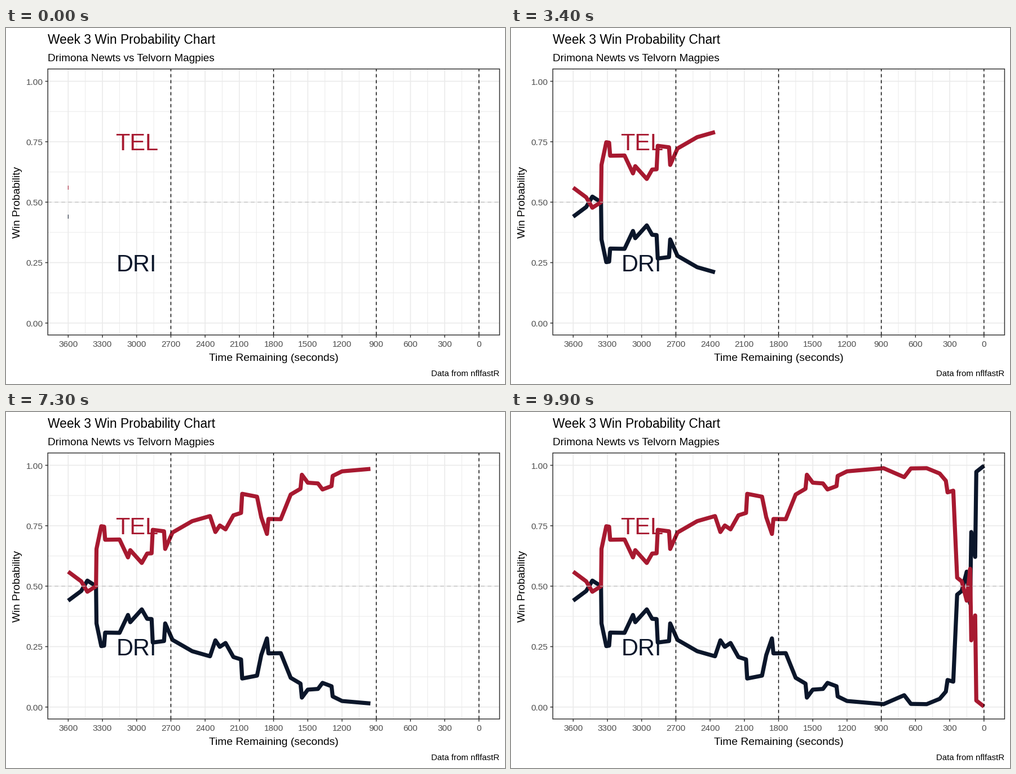
A matplotlib script that plays this animation: 885x632 px, repeating every 10 s.

```python
import numpy as np
import matplotlib.pyplot as plt
from matplotlib.animation import FuncAnimation
from matplotlib.patches import Rectangle

W, H, DPI = 885, 632, 100
FRAMES, INTERVAL = 100, 100
GAME = 3600
PX = 72 / DPI  # points per pixel

RED, NAVY = "#A71930", "#0B162A"
GRID, DARK, LABEL = "#EBEBEB", "#333333", "#4D4D4D"
LEFT, RIGHT, TOP, BOTTOM = 74.2, 875.4, 72.7, 545

# turning points: (seconds remaining, win probability of the red team)
plays = np.array([
    (3600, .560), (3486, .520), (3432, .477), (3356, .500), (3352, .654),
    (3310, .748), (3285, .746), (3276, .692), (3150, .693), (3076, .619),
    (3056, .649), (2955, .596), (2908, .635), (2869, .636), (2859, .733),
    (2760, .727), (2750, .654), (2686, .722), (2513, .769), (2357, .790),
    (2310, .724), (2271, .751), (2221, .735), (2152, .793), (2085, .803),
    (2075, .882), (1945, .870), (1908, .785), (1858, .716), (1845, .778),
    (1737, .777), (1650, .879), (1564, .903), (1552, .961), (1500, .928),
    (1411, .925), (1371, .900), (1292, .914), (1282, .956), (1200, .975),
    (880, .988), (699, .951), (640, .987), (502, .988), (388, .966),
    (334, .936), (319, .888), (269, .895), (235, .535), (195, .520),
    (151, .440), (121, .572), (111, .276), (77, .379), (67, .027),
    (0, .002),
])
# each play lands on its nearest animation step
steps = np.rint((FRAMES - 1) * (1 - plays[:, 0] / GAME)).astype(int)


def px(sec):
    return 838.8 - sec * 728.5 / GAME


def py(prob):
    return 523.8 - prob * 429.2


plt.rcParams.update({"font.family": "Liberation Sans", "path.snap": False})
fig = plt.figure(figsize=(W / DPI, H / DPI), dpi=DPI, facecolor="white")
ax = fig.add_axes([0, 0, 1, 1])
ax.set(xlim=(0, W), ylim=(H, 0))
ax.axis("off")


def line(xs, ys, width, color, z, **kw):
    return ax.plot(xs, ys, lw=width * PX, color=color, zorder=z,
                   solid_capstyle="butt", solid_joinstyle="round", **kw)[0]


def vert(sec, *args, **kw):
    line([px(sec)] * 2, [BOTTOM, TOP], *args, **kw)


def horiz(prob, *args, **kw):
    line([LEFT, RIGHT], [py(prob)] * 2, *args, **kw)


def text(x, y, s, size, color="black", ha="left", **kw):
    ax.text(x, y, s, fontsize=size * PX, color=color, ha=ha,
            va="baseline", zorder=8, **kw)


# panel grid and ticks
for sec in range(150, GAME, 300):
    vert(sec, 1, GRID, 1)
for prob in np.arange(.125, 1, .25):
    horiz(prob, 1, GRID, 1)
for sec in range(0, GAME + 1, 300):
    x = px(sec)
    vert(sec, 1.7, GRID, 2)
    line([x, x], [BOTTOM, BOTTOM + 4.6], 1.5, DARK, 7)
    text(x, 566, str(sec), 15.4, LABEL, "center")
for prob in np.arange(0, 1.1, .25):
    y = py(prob)
    horiz(prob, 1.7, GRID, 2)
    line([LEFT - 4.6, LEFT], [y, y], 1.5, DARK, 7)
    text(65.5, y + 6, f"{prob:.2f}", 15.4, LABEL, "right")

# reference lines and frame
horiz(.5, 1.2, "#BEBEBE", 5, dashes=(5.5, 4.5))
for sec in range(0, 2701, 900):
    vert(sec, 1.4, "black", 6, dashes=(4, 3.6))
ax.add_patch(Rectangle((LEFT, TOP), RIGHT - LEFT, BOTTOM - TOP, fill=False,
                       ec=DARK, lw=1.5 * PX, zorder=7))

# labels
text(74, 28, "Week 3 Win Probability Chart", 22.7)
text(74, 59, "Drimona Newts vs Telvorn Magpies", 19.06)
text(474.5, 591, "Time Remaining (seconds)", 19.25, ha="center")
text(25, 309, "Win Probability", 19.1, ha="center", rotation=90,
     rotation_mode="anchor")
text(875, 618, "Data from nflfastR", 15, ha="right")
text(px(3000), 217, "TEL", 41.5, RED, "center")
text(px(3000), 431.5, "DRI", 41.5, NAVY, "center")

navy = line([], [], 7.2, NAVY, 3)
red = line([], [], 7.2, RED, 4)


def revealed(step):
    if step == 0:  # a thin sliver marks the start
        return plays[0] + np.array([[2.5, 0], [-2.5, 0]])
    n = np.searchsorted(steps, step, side="right")
    if steps[n - 1] == step:
        return plays[:n]
    k = (step - steps[n - 1]) / (steps[n] - steps[n - 1])
    tip = plays[n - 1] + k * (plays[n] - plays[n - 1])
    return np.vstack([plays[:n], tip])


def update(step):
    sec, prob = revealed(step).T
    red.set_data(px(sec), py(prob))
    navy.set_data(px(sec), py(1 - prob))
    return navy, red


anim = FuncAnimation(fig, update, frames=FRAMES, interval=INTERVAL,
                     repeat=True, repeat_delay=0, blit=False)
plt.show()
```
